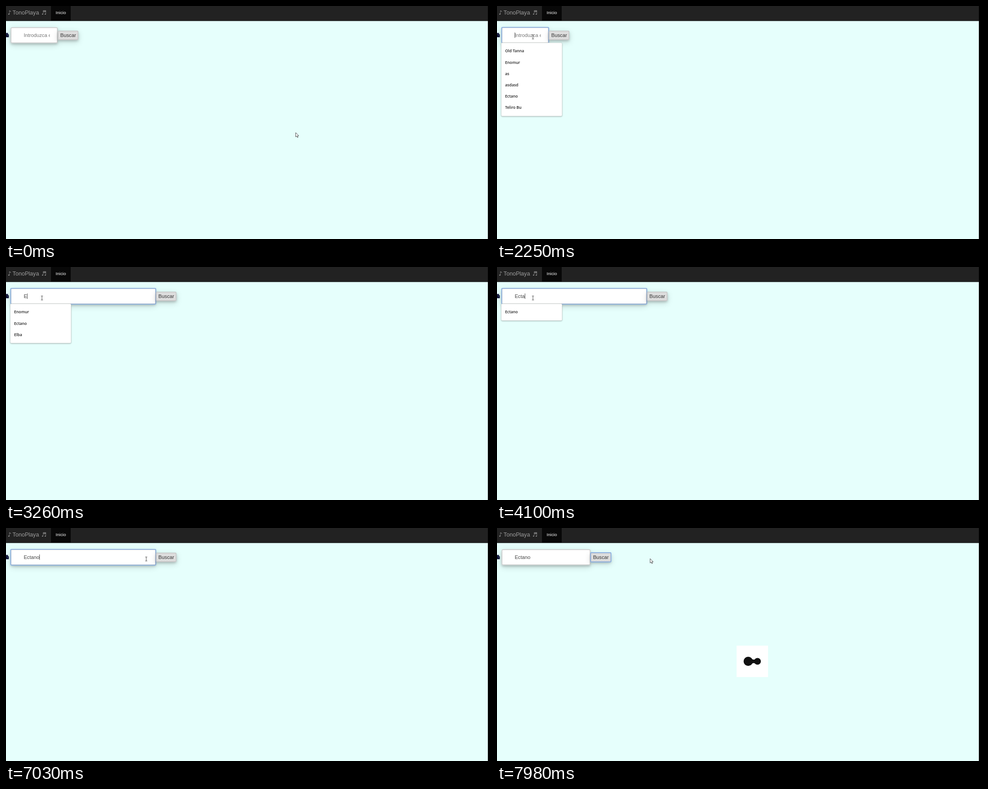
An HTML page with a canvas for the animation above (8000 ms loop, 1079 by 519 pixels).

```html
<!DOCTYPE html>
<html lang="es">
<head>
<meta charset="utf-8">
<title>Buscador de música</title>
<style>
  html, body { margin: 0; width: 100%; height: 100%; overflow: hidden; background: #e6fffc; }
  canvas { display: block; }
</style>
</head>
<body>
<canvas id="stage" width="1079" height="519"></canvas>
<script>
const ctx = document.getElementById('stage').getContext('2d');
const LOOP = 8000;
const SANS = '"Liberation Sans", Arial, sans-serif';
const LIST = '"Open Sans", "Noto Sans", sans-serif';
const SYMBOL = '"DejaVu Sans", sans-serif';

const QUERY = 'Ectano';
const KEY_TIMES = [3260, 3540, 3930, 4100, 4540, 4710];
const HISTORY = ['Old Tanna', 'Enomur', 'as', 'asdasd', QUERY, 'Teliro Bu', 'Elba'];
const LIST_ROWS = 6;

const FIELD = { x: 10.5, y: 47.6, h: 35, narrow: 104.5, wide: 322.8 };
const FOCUS = 2180, CLICK = 7750, LOADING = 7830;
const BLINK = 540;

const START = { x: 644.5, y: 282 };
const MOVES = [
  { from: 50, to: 70, x: 622.5, y: 265.5 },
  { from: 180, to: 360, x: 476.5, y: 224.5 },
  { from: 490, to: 660, x: 390.5, y: 185.5 },
  { from: 760, to: 1010, x: 185.5, y: 99.5 },
  { from: 1220, to: 1470, x: 105, y: 74.5 },
  { from: 1470, to: 1770, x: 80, y: 69 },
  { from: 6300, to: 7030, x: 312, y: 69, lift: 10 },
  { from: 7280, to: 7580, x: 340.7, y: 68.3 }
];

const smooth = v => {
  const p = Math.min(1, Math.max(0, v));
  return p * p * (3 - 2 * p);
};
const mix = (a, b, p) => a + (b - a) * p;

function text(str, x, y, size, color, font = SANS, weight = 400) {
  ctx.font = `${weight} ${size}px ${font}`;
  ctx.fillStyle = color;
  ctx.fillText(str, x, y);
}

function rect(x, y, w, h, color) {
  ctx.fillStyle = color;
  ctx.fillRect(x, y, w, h);
}

function roundBox(x, y, w, h, r) {
  ctx.beginPath();
  ctx.roundRect(x, y, w, h, r);
}

function outline(x, y, w, h, r, width, color) {
  ctx.lineWidth = width;
  ctx.strokeStyle = color;
  roundBox(x, y, w, h, r);
  ctx.stroke();
}

function castShadow(alpha, blur, dy) {
  ctx.save();
  ctx.shadowColor = `rgba(0,0,0,${alpha})`;
  ctx.shadowBlur = blur;
  ctx.shadowOffsetY = dy;
  ctx.fill();
  ctx.restore();
}

function raisedBox(x, y, w, h, fill, border, focused) {
  ctx.fillStyle = fill;
  roundBox(x, y, w, h, 2.6);
  castShadow(.17, 14, 4.2);
  castShadow(.18, 5.6, 2.8);
  outline(x + .7, y + .7, w - 1.4, h - 1.4, 2, 1.4, border);
  if (focused) outline(x - .1, y - .1, w + .2, h + .2, 1.6, 1.6, '#86aee6');
}

function drawPage() {
  rect(0, 0, 1079, 519, '#e6fffc');
  rect(0, 0, 1072, 33, '#222');
  rect(0, 32.4, 1072, 1, '#0a0a0a');
  rect(100, 0, 44, 33, '#080808');
  rect(1072, 0, 7, 519, '#000');
  text('♪', 4, 19, 12.6, '#9d9d9d', SYMBOL);
  text('TonoPlaya', 14.6, 19, 12.6, '#9d9d9d');
  text('♬', 78.5, 19, 12.6, '#9d9d9d', SYMBOL);
  text('Inicio', 110.6, 18, 9.8, '#fff');
}

function drawIcon() {
  rect(0, 60, 4.5, 7, '#0b1033');
  rect(0, 63, 6.3, 6.5, '#0b1033');
  rect(1, 61.5, 2, 1, '#7d8bb0');
  rect(2.5, 65, 2, 1, '#7d8bb0');
}

const typedText = t => QUERY.slice(0, KEY_TIMES.filter(k => k <= t).length);

function fieldWidth(t) {
  const open = smooth((t - 2250) / 320) - smooth((t - CLICK - 11) / 400);
  return mix(FIELD.narrow, FIELD.wide, open);
}

function caretVisible(t) {
  const lastInput = Math.max(FOCUS, ...KEY_TIMES.filter(k => k <= t));
  return (t - lastInput) % (2 * BLINK) < BLINK;
}

function drawSearch(t) {
  const width = fieldWidth(t);
  const right = FIELD.x + width;
  const typed = typedText(t);
  const focused = t >= FOCUS && t < CLICK;

  raisedBox(FIELD.x, FIELD.y, width, FIELD.h, '#fff', '#c4c6c6', focused);
  raisedBox(right + .5, 55, 45.3, 20.5, '#ddd', '#c6c6c6', t >= CLICK);
  text('Buscar', right + 5.8, 69, 11.2, '#333');

  ctx.save();
  ctx.beginPath();
  ctx.rect(39, 50, right - 17.5 - 39, 30);
  ctx.clip();
  text(typed || 'Introduzca el artista..', 39.4, 69, 11.2, typed ? '#444' : '#757575');
  ctx.restore();

  if (focused && caretVisible(t)) {
    ctx.font = `11.2px ${SANS}`;
    rect(39.4 + ctx.measureText(typed).width, 59, .9, 12, '#333');
  }
}

function drawPopup(t) {
  const typed = typedText(t);
  if (t < FOCUS || typed === QUERY) return;
  const items = HISTORY.filter(name => name.startsWith(typed)).slice(0, LIST_ROWS);
  const height = 12 + 25.2 * items.length;
  ctx.fillStyle = '#fff';
  roundBox(9.5, 82, 135.3, height, 2.5);
  castShadow(.35, 3, 1);
  outline(9.5, 82, 135.3, height, 2.5, .5, '#c8d0cf');
  items.forEach((item, i) => text(item, 18, 103.4 + 25.2 * i, 8.7, '#222', LIST, 600));
}

function drawLoader(t) {
  if (t < LOADING) return;
  rect(533, 262, 70, 70, '#fff');
  ctx.fillStyle = '#111';
  ctx.beginPath();
  ctx.arc(558.8, 297, 10.2, 0, Math.PI * 2);
  ctx.arc(579.6, 297, 7.5, 0, Math.PI * 2);
  ctx.fill();
  ctx.beginPath();
  ctx.moveTo(564.5, 288.6);
  ctx.quadraticCurveTo(570.5, 297, 576, 290.4);
  ctx.lineTo(576, 303.6);
  ctx.quadraticCurveTo(570.5, 297, 564.5, 305.4);
  ctx.fill();
}

function drawArrow(x, y) {
  const shape = new Path2D('M0 0V9.6L2.2 7.6L3.8 11L5.3 10.4L3.8 7.1H6.8Z');
  ctx.save();
  ctx.translate(x, y);
  ctx.fillStyle = '#fff';
  ctx.fill(shape);
  ctx.lineWidth = .8;
  ctx.strokeStyle = '#222';
  ctx.stroke(shape);
  ctx.restore();
}

function drawBeam(x, y) {
  rect(x - .5, y - 5, 1, 10, '#444');
  rect(x - 2.3, y - 5, 4.6, .9, '#555');
  rect(x - 2.3, y + 4.1, 4.6, .9, '#555');
}

function pointerAt(t) {
  let { x, y } = START;
  for (const move of MOVES) {
    const p = smooth((t - move.from) / (move.to - move.from));
    x = mix(x, move.x, p);
    y = mix(y, move.y, p) - (move.lift || 0) * Math.sin(Math.PI * p);
  }
  return { x, y };
}

function drawPointer(t) {
  const { x, y } = pointerAt(t);
  const inField = x > FIELD.x && x < FIELD.x + fieldWidth(t)
    && y > FIELD.y && y < FIELD.y + FIELD.h;
  (inField ? drawBeam : drawArrow)(x, y);
}

function draw(t) {
  drawPage();
  drawIcon();
  drawSearch(t);
  drawPopup(t);
  drawLoader(t);
  drawPointer(t);
}

const start = performance.now();
function tick() {
  draw((performance.now() - start) % LOOP);
  requestAnimationFrame(tick);
}
tick();
</script>
</body>
</html>
```
